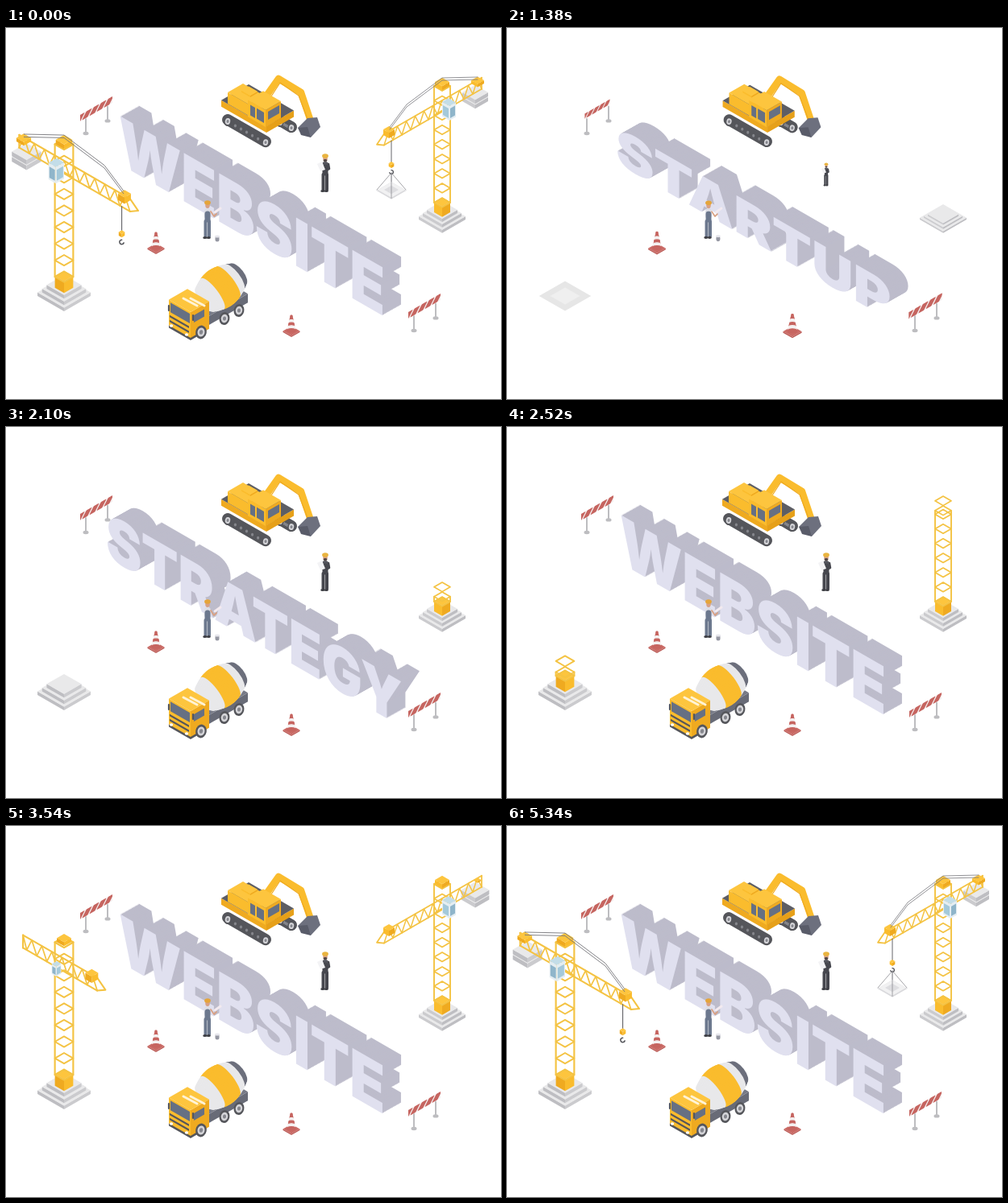
Write an HTML page with a canvas that moves like this. It is 614 px wide and 461 px high and loops after 5370 ms.

```html
<!DOCTYPE html>
<html lang="en">
<head>
<meta charset="utf-8">
<title>Construction site</title>
<style>
html, body { margin: 0; width: 100%; height: 100%; overflow: hidden; background: #fff; }
canvas { display: block; }
</style>
</head>
<body>
<canvas id="stage" width="614" height="461"></canvas>
<script>
const ctx = document.getElementById('stage').getContext('2d');
const LOOP = 5370, CLEAR = 570, BUILD = 750, SLOPE = 0.577;
const GOLD = '#fabc2d', BRIGHT = '#fdc53e', AMBER = '#efaa20', TRUSS = '#f4c343';
const DARK = '#55565b', STEEL = '#777a86', GLASS = '#667083', RED = '#c66560', SKIN = '#d8a184';
let time = 0;

const progress = (start, length = 500) => Math.min(1, Math.max(0, (time - start) / length));
const easeOut = p => 1 - (1 - p) ** 3;
const easeInOut = p => p < 0.5 ? 4 * p ** 3 : 1 - 4 * (1 - p) ** 3;
const overshoot = p => 1 + 2.7 * (p - 1) ** 3 + 1.7 * (p - 1) ** 2;
const mix = (a, b, p) => a + (b - a) * p;

function trace(points) {
  ctx.beginPath();
  for (let i = 0; i < points.length; i += 2) ctx.lineTo(points[i], points[i + 1]);
}
function shape(color, ...points) {
  trace(points);
  ctx.fillStyle = color;
  ctx.fill();
}
function line(color, width, ...points) {
  trace(points);
  ctx.strokeStyle = color;
  ctx.lineWidth = width;
  ctx.stroke();
}
function oval(color, x, y, rx, ry = rx, angle = 0) {
  ctx.beginPath();
  ctx.ellipse(x, y, rx, ry, angle, 0, 7);
  ctx.fillStyle = color;
  ctx.fill();
}

// Upright isometric panel running from x, y to the right, or to the left if run < 0
function panel(color, x, y, run, h) {
  const far = y - Math.abs(run) * SLOPE;
  shape(color, x, y, x + run, far, x + run, far - h, x, y - h);
}
// Isometric box with its nearest bottom corner at x, y
function box(x, y, left, right, h, [top, leftColor, rightColor]) {
  panel(leftColor, x, y, -left, h);
  panel(rightColor, x, y, right, h);
  const t = y - h, l = left * SLOPE, r = right * SLOPE;
  shape(top, x, t, x - left, t - l, x + right - left, t - l - r, x + right, t - r);
}
const block = (x, y, w, h, colors) => box(x, y + w * SLOPE, w, w, h, colors);
const diamond = (color, x, y, w) => block(x, y, w, 0, [color, color, color]);

const YELLOW = [BRIGHT, GOLD, AMBER];
const STONE = ['#e9e9ea', '#cbcbce', '#bebec2'];

function at(x, y, draw, sx = 1, sy = sx) {
  ctx.save();
  ctx.translate(x, y);
  ctx.scale(sx, sy);
  draw();
  ctx.restore();
}
function pop(start, x, y, draw) {
  const s = overshoot(progress(start));
  if (s > 0.001) at(x, y, () => { ctx.translate(-x, -y); draw(); }, s);
}

function word(text, x, y, size, rise = 1) {
  if (rise <= 0) return;
  ctx.font = `900 ${size}px Inter, sans-serif`;
  for (let i = 23; i >= 0; i--) {
    ctx.fillStyle = i ? '#bdbccb' : '#e0e0ef';
    ctx.save();
    ctx.transform(0.866, 0.5, 0, rise, x + i, y - i * 0.565);
    ctx.fillText(text, 0, 0);
    ctx.restore();
  }
}
function words() {
  if (time < 1900) word('STARTUP', 135, 167, 82.5, easeOut(progress(1250, 350)));
  else if (time < 2500) word('STRATEGY', 124, 161, 77);
  else word('WEBSITE', 140, 168.5, 82.5);
}

function barrier(x, y, start) {
  at(x, y, () => {
    const up = easeOut(progress(start, 250));
    if (up) for (const px of [7, 34]) {
      const py = 49 - px * SLOPE;
      oval('#bdbdc0', px, py, 3.5 * up, 2.2 * up);
      line('#bdbdc0', 2, px, py, px, py - 18 * up);
    }
    pop(start + 215, 20, 15, () => {
      panel('#f5f0f0', 0, 30, 40, 8);
      ctx.clip();
      for (let px = -4; px < 40; px += 9) {
        const py = 30 - px * SLOPE;
        line(RED, 4.5, px, py + 1, px + 7, py - 13);
      }
    });
  });
}

function cone(x, y, start) {
  pop(start, x, y, () => at(x, y, () => {
    block(0, 7, 10.5, 1.5, ['#ca6b66', '#b85550', '#b85550']);
    for (let h = -14; h < 6; h += 0.5) {
      const r = 1.5 + (h + 14) * 0.2;
      oval((h + 16) % 8 < 4 && h > -10 ? '#f4f1f1' : RED, 0, h, r, r * 0.4);
    }
  }));
}

function wheel(x, y, r) {
  [DARK, '#d4d4d8', '#85868d'].forEach((color, i) => {
    const s = r * (1 - i * 0.34);
    oval(color, x, y, s * 0.8, s, 0.2);
  });
}

function track(x, y, length) {
  line(DARK, 14, x, y, x + length, y + length * SLOPE);
  for (let p = 0.2; p < 0.9; p += 0.15) oval('#85868c', x + length * p, y + 2 + length * SLOPE * p, 1.6, 2);
  wheel(x, y + 2, 6);
  wheel(x + length, y + 1 + length * SLOPE, 6);
}

function excavator() {
  track(340, 115, 14);
  track(275, 114, 47);
  box(323, 130, 56, 34, 8, ['#5d5e64', AMBER, '#e6a019']);
  box(301, 109, 26, 19, 14, YELLOW);
  box(303, 86, 11, 9, 2, YELLOW);
  line(GOLD, 8.5, 321, 87, 338, 63, 366, 80, 377, 113);
  line(AMBER, 1.2, 327, 88, 340, 68, 363, 84, 374, 113);
  box(322, 123, 22, 19, 21, YELLOW);
  panel(GLASS, 320, 118, -9, 13);
  panel(GLASS, 309, 112, -6, 13);
  panel(GLASS, 325, 114, 14, 10);
  shape('#6d707e', 362, 124, 374, 112, 386, 111, 390, 123, 378, 136);
  shape('#595c69', 362, 124, 374, 123, 378, 136, 366, 133);
}

function drum() {
  for (let p = 1; p >= 0; p -= 0.02) {
    const color = p > 0.88 ? '#6c6f7c' : p > 0.7 || p < 0.24 ? '#e8e8ea' : GOLD;
    oval(color, mix(246, 288, p), mix(338, 306, p), 7, 13 + 13 * Math.sin(0.4 + 2.5 * p), -0.65);
  }
}

function truck() {
  box(250, 370, 5, 50, 11, [STEEL, '#5e616c', '#686b77']);
  drum();
  box(229, 387, 27, 23, 34, YELLOW);
  for (const x of [220, 229]) line('#fff3d5', 3, x, 336, x + 17, 345);
  panel(GLASS, 228, 367, -24, 12);
  panel(GLASS, 233, 366, 13, 9);
  for (const y of [373, 379]) panel(DARK, 227, y, -24, 2.5);
  panel(DARK, 229, 388, -27, 3);
  panel(DARK, 229, 388, 12, 3);
  for (const x of [205, 224]) oval('#fff', x, 381 - (224 - x) * SLOPE, 2.2, 1.8);
  for (const x of [202, 232]) line(DARK, 2.2, x, 345 + (x - 202) * 0.4, x, 351 + (x - 202) * 0.4);
  wheel(242, 378, 8.5);
  wheel(271, 361, 8);
  wheel(289, 351, 8);
}

// Figure standing with its feet around x, y
function worker(x, y, suit, shirt, hat, addTools) {
  at(x, y, () => {
    for (const side of [-2.5, 2]) {
      line(suit, 4, side, -22, side, -3);
      oval('#3c3d43', side - 0.7, -1.5, 2.6, 1.6);
    }
    line(shirt, 8, 0, -34, 0, -29);
    line(suit, 7, 0, -31, 0, -24);
    oval(SKIN, 0, -42, 2.8, 4);
    oval(hat, 0, -45, 3.9, 2.8);
    addTools();
  });
}
const inspector = () => worker(396, 204, '#46474e', '#54555d', '#e9b440', () => {
  line('#46474e', 2.5, 4, -35, 5, -29, 0, -27);
  oval('#4c4343', 0, -39.5, 2.4, 1.6);
  shape('#f3f3f5', -10, -35, -4, -38, 0, -28, -6, -26);
});
const painter = () => worker(250, 262, '#6c788e', '#dcdde5', '#e5a53a', () => {
  line(SKIN, 1.8, 4, -34, 8, -28, 11, -31);
  line('#f3eaef', 3, 9, -33, 16, -38);
  line('#9698a3', 5, 12, -1, 12, 1);
  oval('#e6e6ec', 12, -3, 3, 1.5);
});

function mast(grow) {
  if (!grow) return;
  const foot = 217, top = foot - 145 * grow;
  const ring = y => line(TRUSS, 1.7, 531, y, 541, y - 5.8, 551, y, 541, y + 5.8, 531, y);
  for (let y = foot; y > top; y -= 18.1) ring(y);
  ring(top);
  if (grow < 1) ring(Math.max(72, top - 12));
  for (const x of [531, 551]) line(TRUSS, 1.9, x, foot, x, top);
}

function jib(p) {
  if (!p) return;
  const tip = 541 - 81 * p, end = 541 + 49 * easeOut(p), neck = Math.min(541, tip + 9);
  const y = x => 98 - (x - 541) * SLOPE;
  for (const offset of [-8, 6]) line(TRUSS, 1.8, neck, y(neck) + offset, end, y(end) + offset);
  for (let x = neck; x < end; x += 11) {
    const mid = Math.min(end, x + 5.5), next = Math.min(end, x + 11);
    line(TRUSS, 1.5, x, y(x) + 6, mid, y(mid) - 8, next, y(next) + 6);
  }
  line(TRUSS, 1.8, end, y(end) - 8, end, y(end) + 6);
  line(TRUSS, 1.8, neck, y(neck) - 8, tip, y(tip), neck, y(neck) + 6);
  const hub = Math.min(541, tip + 15);
  block(hub, y(hub) - 3, 7, 7, YELLOW);
}

function cab() {
  box(550, 115, 9, 8, 18, ['#c3dde8', '#e4edf2', '#e4edf2']);
  panel('#a4c9da', 549, 112, -7, 12);
  panel('#8fb5ca', 551, 112, 6, 12);
}

function hook() {
  block(478, 172, 3.3, 4, YELLOW);
  ctx.beginPath();
  ctx.arc(478, 179, 2.4, -1.6, 2.8);
  ctx.strokeStyle = DARK;
  ctx.lineWidth = 1.4;
  ctx.stroke();
}

function load() {
  diamond('#d9d9dc', 478, 202, 18.5);
  diamond('#f1f1f2', 478, 201, 17);
  diamond('#dddde0', 478, 201, 9);
  for (const side of [-18, 18]) {
    line('#8d8d92', 0.8, 478, 180, 478 + side, 201);
    line('#8d8d92', 0.8, 478, 180, 478, 201 + side * SLOPE);
  }
}

// Drawn in the coordinates of the right-hand crane
function crane(delay, loaded) {
  const from = (start, length) => progress(start + delay, length);
  const popLate = (start, x, y, draw) => pop(start + delay, x, y, draw);

  const spread = easeOut(from(BUILD, 250)), raise = easeOut(from(1300, 350));
  if (!spread) return;
  if (raise) {
    for (let i = 0; i < 3; i++) block(541, 238 - 4 * i * raise, 29 - 5 * i, 4 * raise, STONE);
  } else {
    diamond('#e6e6e6', 541, 238, 29 * spread);
    diamond('#efefef', 541, 238, 16.5 * spread);
  }
  const cube = easeOut(from(1660, 350));
  if (cube) block(541, 229, 10 * cube, 13 * cube, YELLOW);

  popLate(3200, 582, 86, () => {
    for (const y of [91, 85]) block(582, y, 16, 5, STONE);
  });
  mast(easeInOut(from(1870, 1050)));
  jib(from(2700, 700));
  popLate(2950, 541, 70, () => block(541, 72, 9, 5, YELLOW));
  popLate(3480, 585, 68, () => block(585, 69, 8, 4, YELLOW));
  popLate(3010, 549, 101, cab);

  ctx.globalAlpha = from(3800, 250);
  for (const shift of [0, 3]) line('#77777b', 0.8, 585, 61 + shift, 541, 62 + shift, 497, 95 + shift, 476, 123 + shift);
  ctx.globalAlpha = 1;

  const drop = easeOut(from(4100, 400));
  if (drop) line('#66666a', 1, 478, 140, 478, 140 + 27 * drop);
  popLate(4200, 478, 170, hook);
  if (loaded) popLate(4350, 478, 194, load);
}

function render(now) {
  time = now % LOOP;
  if (time < CLEAR) time += LOOP;
  ctx.clearRect(0, 0, 614, 461);
  if (time >= BUILD) {
    barrier(92, 86, 1050);
    pop(1200, 328, 140, excavator);
    words();
    pop(1300, 396, 185, inspector);
    pop(1200, 252, 242, painter);
    cone(186, 268, 970);
    cone(354, 371, 1080);
    pop(1560, 251, 338, truck);
    barrier(499, 331, BUILD);
    crane(0, true);
    at(72, 333, () => { ctx.translate(-541, -238); crane(450, false); }, -1.136, 1.136);
  }
  requestAnimationFrame(() => render(performance.now()));
}
ctx.lineCap = ctx.lineJoin = 'round';
render(0);
</script>
</body>
</html>
```
